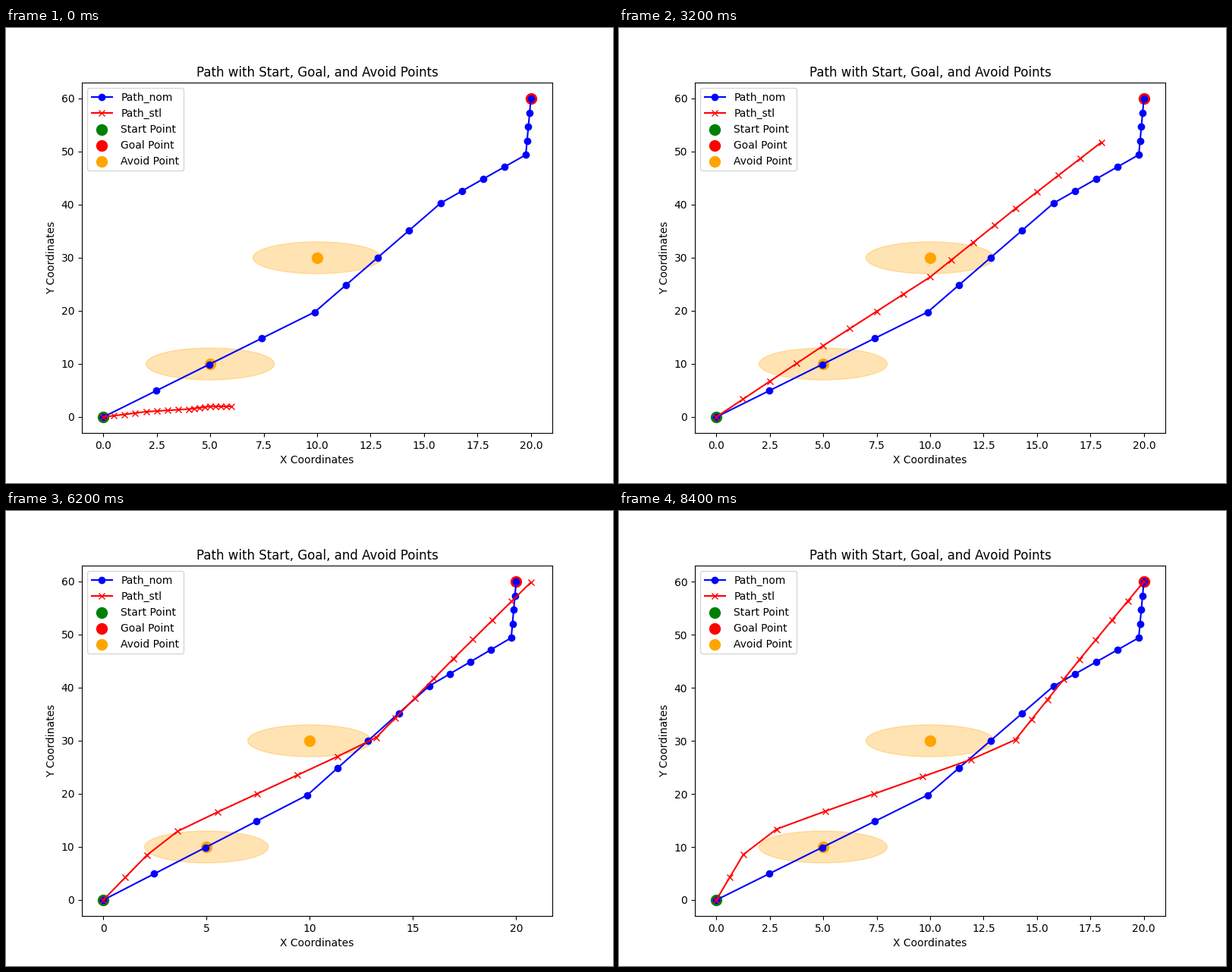
Animation, 800 px wide and 600 px high, one loop 8500 ms. Source, as a matplotlib script:

```python
import matplotlib.pyplot as plt
import numpy as np
from matplotlib.animation import FuncAnimation
from matplotlib.patches import Circle

FRAMES = 85
SUBSTEPS = 200
RATE = 0.1 / SUBSTEPS

GOAL = np.array([20.0, 60.0])
AVOID = np.array([[5.0, 10.0], [10.0, 30.0]])
AVOID_RADIUS = 3.0
GOAL_RADIUS = 1.0


def subdivide(corners, n=4):
    """Split every leg between corners into n equal steps."""
    corners = np.array(corners, float)
    at = np.linspace(0, len(corners) - 1, n * (len(corners) - 1) + 1)
    legs = np.arange(len(corners))
    return np.column_stack([np.interp(at, legs, c) for c in corners.T])


def ascend(path):
    """Move the steps of the path one notch up the worst robustness margin."""
    to_goal = GOAL - path[-1]
    goal_dist = np.hypot(*to_goal)
    away = path[:, None, :] - AVOID
    dist = np.hypot(away[..., 0], away[..., 1])
    k, j = divmod(int(dist.argmin()), len(AVOID))
    if GOAL_RADIUS - goal_dist < dist[k, j] - AVOID_RADIUS:
        k, push = len(path) - 1, to_goal / max(goal_dist, 1e-9)
    else:
        push = away[k, j] / max(dist[k, j], 1e-9)
    # Shifting steps 1..k moves each point by the number of steps before it.
    return path + RATE * np.minimum(order, k)[:, None] * push


nominal = subdivide([(0, 0), (9.89, 19.78), (15.78, 40.3), (19.76, 49.4), (20, 60)])
path = subdivide([(0, 0), (2, 1), (4, 1.5), (5, 2), (6, 2)])
order = np.arange(len(path))

paths = [path]
for _ in range(FRAMES - 1):
    for _ in range(SUBSTEPS):
        path = ascend(path)
    paths.append(path)

fig, ax = plt.subplots(figsize=(8, 6), dpi=100)
ax.plot(*nominal.T, "o-", color="blue", label="Path_nom")
stl_line, = ax.plot(*paths[0].T, "x-", color="red", label="Path_stl")
ax.scatter(0, 0, s=100, color="green", label="Start Point")
ax.scatter(*GOAL, s=100, color="red", label="Goal Point")
ax.scatter(*AVOID.T, s=100, color="orange", label="Avoid Point")
for center in AVOID:
    ax.add_patch(Circle(center, AVOID_RADIUS, color="orange", alpha=0.3))
ax.set_title("Path with Start, Goal, and Avoid Points")
ax.set_xlabel("X Coordinates")
ax.set_ylabel("Y Coordinates")
ax.legend(loc="upper left")


def update(i):
    stl_line.set_data(*paths[i].T)
    points = np.vstack([nominal, paths[i]])
    low, high = points.min(axis=0), points.max(axis=0)
    pad = 0.05 * (high - low)
    ax.set_xlim(low[0] - pad[0], high[0] + pad[0])
    ax.set_ylim(low[1] - pad[1], high[1] + pad[1])
    return [stl_line]


anim = FuncAnimation(fig, update, frames=FRAMES, interval=100,
                     init_func=lambda: update(0), repeat=True, repeat_delay=0)
plt.show()
```
